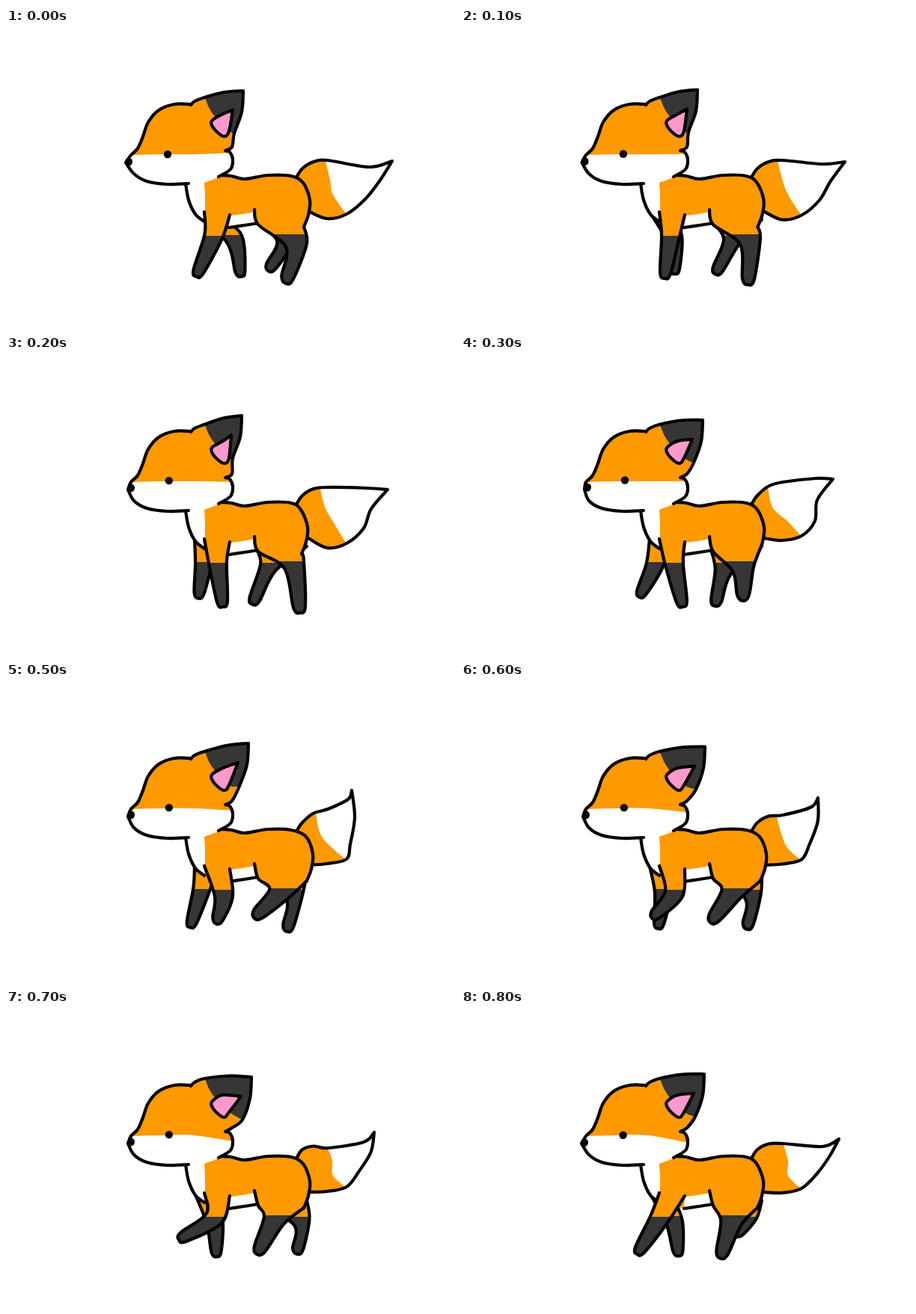
Recreate the animation shown at these times as an HTML page with a canvas. Size 600x400 px, loop 900 ms.

```html
<!DOCTYPE html>
<html lang="en">
<head>
<meta charset="utf-8">
<title>Walking fox</title>
<style>
html, body { margin: 0; width: 100%; height: 100%; overflow: hidden; background: #fff; }
canvas { display: block; width: 600px; height: 400px; }
</style>
</head>
<body>
<canvas id="stage" width="600" height="400"></canvas>
<script>
const ctx = document.getElementById('stage').getContext('2d');
const ORANGE = '#ff9900', DARK = '#363636', PINK = '#ff99cc', WHITE = '#fff', BLACK = '#000';

// Six key poses of the walk; the rest of each shape follows from these points.
const walk = {
  // rump shift
  sway: [[0], [-3], [-1], [4], [0], [-2]],
  // muzzle shift, height of the mask at the cheek, ear tip
  head: [[0, 167, 317, 84], [3, 170, 315, 81], [5, 169, 323, 87],
         [3, 172, 324, 82], [3, 177, 328, 91], [1, 179, 325, 87]],
  // x of the white edge, crest height, neck of the tip, tip, lowest height, bow of the lower side
  tail: [[426, 177, 485, 186, 516, 178, 249, 2], [419, 177, 480, 178, 510, 180, 252, -6],
         [409, 170, 475, 165, 497, 166, 242, -9], [413, 170, 457, 157, 462, 145, 237, 5],
         [429, 186, 478, 178, 492, 165, 238, 6], [430, 180, 483, 184, 505, 174, 240, 2]],
  // knee, paw
  nearFront: [[277, 279, 257, 326], [283, 278, 289, 330], [285, 280, 295, 330],
              [291, 287, 283, 317], [278, 280, 237, 305], [264, 282, 239, 322]],
  farFront: [[305, 282, 313, 326], [264, 280, 258, 319], [258, 283, 241, 318],
             [261, 278, 248, 322], [279, 285, 281, 325], [285, 285, 290, 324]],
  nearHind: [[388, 291, 376, 334], [385, 280, 392, 337], [377, 287, 377, 321],
             [365, 283, 337, 310], [358, 283, 339, 321], [361, 286, 349, 326]],
  farHind: [[373, 287, 354, 319], [350, 284, 332, 327], [350, 290, 341, 329],
            [385, 288, 377, 327], [395, 285, 390, 321], [384, 280, 371, 298]]
};

// Key pose shown in each 100 ms step; halves lie between two poses.
const STEPS = [0, 0.5, 1, 2, 2.5, 3, 3.5, 4, 5];

const CHEST = '265,259 253,249 244,230 240,208';
const BELLY = '337,261 318,264 298,267';

function poseAt(rows, key) {
  const a = rows[Math.floor(key)], b = rows[Math.ceil(key)];
  return a.map((v, i) => v + (b[i] - v) * (key % 1));
}

const xy = text => text.split(',').map(Number);
const along = (p, dir, dist) => [p[0] + dir[0] * dist, p[1] + dir[1] * dist];
const normal = ([x, y]) => [-y, x];

function unit(x, y) {
  const size = Math.hypot(x, y);
  return [x / size, y / size];
}

// Smooth curve through "x,y" points, broken at each "|".
function curve(text) {
  const path = new Path2D();
  let end = null;
  for (const run of text.split('|')) {
    const pts = run.trim().split(/\s+/).map(xy);
    if (end) pts.unshift(end);
    else path.moveTo(...pts[0]);
    for (let i = 0; i < pts.length - 1; i++) {
      const b = pts[i], c = pts[i + 1];
      const a = pts[i - 1] || b, d = pts[i + 2] || c;
      path.bezierCurveTo(
        b[0] + (c[0] - a[0]) / 6, b[1] + (c[1] - a[1]) / 6,
        c[0] - (d[0] - b[0]) / 6, c[1] - (d[1] - b[1]) / 6, c[0], c[1]);
    }
    end = pts[pts.length - 1];
  }
  return path;
}

function fill(text, color) {
  ctx.fillStyle = color;
  ctx.fill(curve(text));
}

function stroke(text) {
  ctx.stroke(curve(text));
}

function fillInside(shape, area, color) {
  ctx.save();
  ctx.clip(curve(shape));
  fill(area, color);
  ctx.restore();
}

function dot(x, y, rx, ry = rx) {
  ctx.fillStyle = BLACK;
  ctx.beginPath();
  ctx.ellipse(x, y, rx, ry, 0, 0, Math.PI * 2);
  ctx.fill();
}

// Outline from the front of the hip, around the paw, up to the back of the hip.
function leg([kx, ky, px, py], front, back, kneeWidth, pawWidth, sock) {
  const [fx, fy] = xy(front.split(' ')[0]), [bx, by] = xy(back);
  const thigh = unit(kx - (fx + bx) / 2, ky - (fy + by) / 2);
  const shin = unit(px - kx, py - ky);
  const kneeSide = normal(unit(thigh[0] + shin[0], thigh[1] + shin[1]));
  const pawSide = normal(shin);
  const knee = [kx, ky], paw = [px, py];
  const shape = [
    front,
    along(knee, kneeSide, kneeWidth),
    along(paw, pawSide, pawWidth),
    along(paw, shin, pawWidth),
    along(paw, pawSide, -pawWidth),
    along(knee, kneeSide, -kneeWidth),
    back
  ].join(' ');
  fill(shape, ORANGE);
  fillInside(shape, `200,${sock} | 450,${sock} | 450,400 | 200,400`, DARK);
  stroke(shape);
}

function drawTail([edge, crest, neckX, neckY, tipX, tipY, low, bow]) {
  const sideX = 460 + (tipX - 462) * 0.37, sideY = low - 20;
  const shape = `388,200 396,188 411,${(crest + 181) / 2} 430,${crest} ${neckX},${neckY} ${tipX},${tipY}`
    + ` | ${(tipX + sideX) / 2 + bow},${(tipY + sideY) / 2} ${sideX},${sideY} 455,${low} 429,${low + 6} 404,245`;
  fill(shape, ORANGE);
  fillInside(shape,
    `${edge},${crest - 2} ${edge + 7},203 437,223 456,${low + 2} | 600,300 | 600,60 | ${edge},60`, WHITE);
  stroke(shape);
}

function drawBody(p) {
  const [sway] = p.sway;
  const hip = `${398 + sway},266`;
  const spine = '288,197 301,198 319,202 350,197 381,198'
    + ` ${397 + sway},207 ${406 + sway},230 ${404 + sway},250 ${hip}`;
  fill(`${spine} | ${BELLY} | ${CHEST}`, ORANGE);
  fill(`299,251 316,249 332,246 | ${BELLY}`, WHITE);
  fill(`${CHEST} | 287,199 | 265,207 | 266,225 266,246`, WHITE);
  stroke(BELLY);
  stroke(CHEST);
  leg(p.nearHind, '332,243 337,263', hip, 14, 8, 276);
  leg(p.nearFront, '265,246', '299,250', 12, 7, 278);
  stroke(spine);
}

function drawHead([shift, maskEnd, tipX, tipY]) {
  const endX = tipX - 12, endY = tipY + 57;
  const crown = `247,103 252,98 265,93 ${(265 + tipX) / 2},${(93 + tipY) / 2 - 2.5} ${tipX},${tipY}`
    + ` | ${(tipX + endX) / 2 + 4},${(tipY + endY) / 2} ${endX},${endY} 302,159 293,164`
    + ' | 299,166 303,176 300,189 284,199';
  const face = `244,208 215,209 188,205 171,195 ${160 + shift},180`
    + ' | 167,170 176,161 183,145 190,126 204,110 225,102 247,102';
  const head = `${crown} | ${face}`;

  fill(head, WHITE);
  fillInside(head, `150,173 172,170 210,169 250,169 304,${maskEnd} | 350,160 | 350,60 | 150,60`, ORANGE);
  fillInside(head, `265,91 272,108 282,122 300,139 ${endX},${endY} | 350,${endY} | 350,60 | 265,60`, DARK);
  stroke(crown);
  stroke(face);

  const corner = `${tipX - 14},${tipY + 26}`;
  const inner = `${corner} 290,115 276,123 275,130 283,140 292,145 298,138 ${corner}`;
  fill(inner, PINK);
  stroke(inner);
  dot(216 + shift * 0.6, 169 - shift * 0.3, 5.2);
  dot(164 + shift, 179 - shift * 0.4, 5, 5.5);
}

function draw(key) {
  const p = {};
  for (const part in walk) p[part] = poseAt(walk[part], key);
  ctx.fillStyle = WHITE;
  ctx.fillRect(0, 0, 600, 400);
  ctx.strokeStyle = BLACK;
  ctx.lineWidth = 4.2;
  ctx.lineCap = ctx.lineJoin = 'round';
  drawTail(p.tail);
  leg(p.farHind, '333,257', '402,256', 11, 7, 278);
  leg(p.farFront, '252,246', '282,250', 11, 6.5, 277);
  drawBody(p);
  drawHead(p.head);
}

function tick() {
  draw(STEPS[Math.floor(performance.now() % 900 / 100)]);
  requestAnimationFrame(tick);
}
tick();
</script>
</body>
</html>
```
